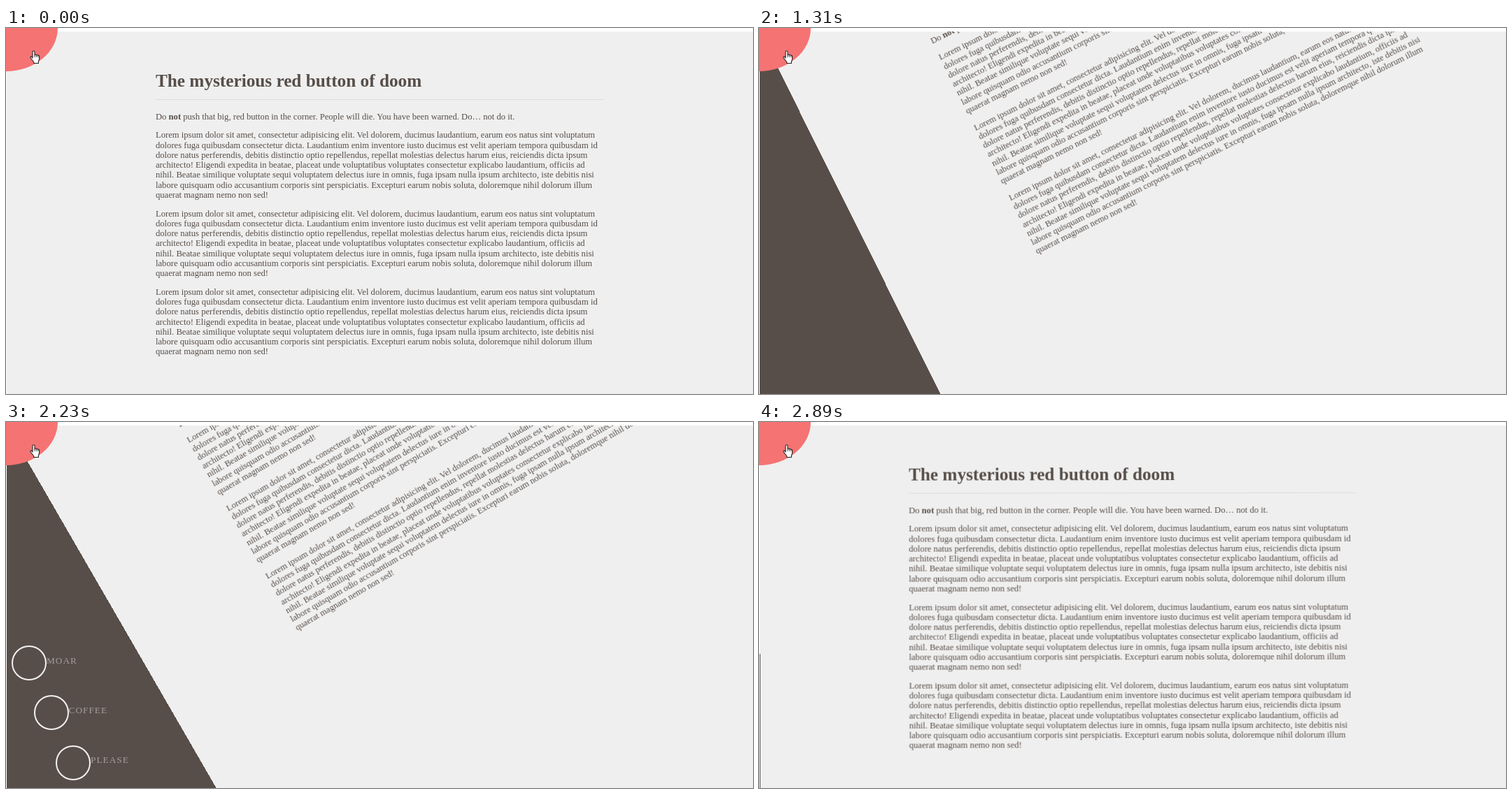
Write an HTML page that moves like this. It is 1068 by 524 pixels and loops after 2960 ms.

```html
<!DOCTYPE html>
<html lang="en">
<head>
<meta charset="utf-8">
<title>The mysterious red button of doom</title>
<style>
  :root {
    --loop: 2960ms;
    --ink: #574e49;
  }
  html, body {
    margin: 0;
    width: 100%;
    height: 100%;
    overflow: hidden;
    background: #fff;
  }
  body {
    position: relative;
    font: 12.62px/14.24px "Liberation Serif", "Times New Roman", serif;
    color: var(--ink);
  }
  .stage {
    position: absolute;
    inset: 5px 0 0 1px;
    overflow: hidden;
    background: var(--ink);
  }
  .page, nav {
    position: absolute;
    left: 0;
    top: 0;
    animation: swing var(--loop) cubic-bezier(.89, 0, .2, 1) infinite;
  }
  .page {
    width: 1400px;
    height: 1200px;
    background: #efefef;
    transform-origin: 0 0;
  }
  nav { animation-name: slide; }
  article {
    position: absolute;
    left: 213px;
    top: 56.5px;
    width: 640px;
    white-space: nowrap;
  }
  h1 {
    margin: 0 0 17.1px;
    height: 40px;
    border-bottom: 1px solid #dcdcdc;
    font-size: 25.24px;
    line-height: 28px;
  }
  p { margin: 0 0 12.62px; }
  nav div {
    position: absolute;
    left: calc(7px + var(--i) * 31.5px);
    top: calc(315.3px + var(--i) * 71.1px);
    box-sizing: border-box;
    width: 50px;
    height: 50px;
    border: 2px solid #f3f1f1;
    border-radius: 50%;
  }
  nav span {
    position: absolute;
    left: 48px;
    top: 11.5px;
    font-size: 13.33px;
    line-height: 16px;
    letter-spacing: 1px;
    color: #a59d9d;
  }
  .button {
    position: absolute;
    left: 0;
    top: 0;
    width: 74px;
    height: 62px;
    border-radius: 0 0 100% 0;
    background: #f57373;
  }
  .hand {
    position: absolute;
    left: 34px;
    top: 32px;
    overflow: visible;
  }
  @keyframes swing {
    0%, 28.21% { transform: rotate(0deg); }
    52.53%, 75.41% { transform: rotate(-30deg); }
    99.39%, 100% { transform: rotate(0deg); }
  }
  @keyframes slide {
    0%, 34.8% { transform: translateX(-228px); }
    58.45%, 75.41% { transform: translateX(0); }
    99.39%, 100% { transform: translateX(-228px); }
  }
</style>
</head>
<body>
<div class="stage">
  <nav>
    <div style="--i:0"><span>MOAR</span></div>
    <div style="--i:1"><span>COFFEE</span></div>
    <div style="--i:2"><span>PLEASE</span></div>
  </nav>
  <div class="page">
    <article>
      <h1>The mysterious red button of doom</h1>
      <p>Do <b>not</b> push that big, red button in the corner. People will die. You have been warned. Do… not do it.</p>
      <p class="lorem">Lorem ipsum dolor sit amet, consectetur adipisicing elit. Vel dolorem, ducimus laudantium, earum eos natus sint voluptatum<br>
        dolores fuga quibusdam consectetur dicta. Laudantium enim inventore iusto ducimus est velit aperiam tempora quibusdam id<br>
        dolore natus perferendis, debitis distinctio optio repellendus, repellat molestias delectus harum eius, reiciendis dicta ipsum<br>
        architecto! Eligendi expedita in beatae, placeat unde voluptatibus voluptates consectetur explicabo laudantium, officiis ad<br>
        nihil. Beatae similique voluptate sequi voluptatem delectus iure in omnis, fuga ipsam nulla ipsum architecto, iste debitis nisi<br>
        labore quisquam odio accusantium corporis sint perspiciatis. Excepturi earum nobis soluta, doloremque nihil dolorum illum<br>
        quaerat magnam nemo non sed!</p>
    </article>
  </div>
</div>
<div class="button"></div>
<svg class="hand" width="16" height="20">
  <path d="M4 11V2.2c0-2 3-2 3 0V7c0-1.5 2.4-1.3 2.4.3.3-1.2 2.2-1 2.3.5.5-1 1.9-.6 1.9.8V12c0 2-1.2 3-1.2 4.5v2H5.8V17C5 15.5 2.3 12.5 1.1 10.8.2 9.4 1.8 8.3 2.8 9.4z"
    fill="#fff" stroke="#222" stroke-width="1.1" stroke-linejoin="round"/>
  <path d="M7 7v3M9.4 7.5V10M11.7 8v2.2" fill="none" stroke="#222" stroke-width=".8"/>
</svg>
<script>
  // The same paragraph appears three times.
  const lorem = document.querySelector('.lorem');
  for (let i = 0; i < 2; i++) lorem.after(lorem.cloneNode(true));
</script>
</body>
</html>
```
